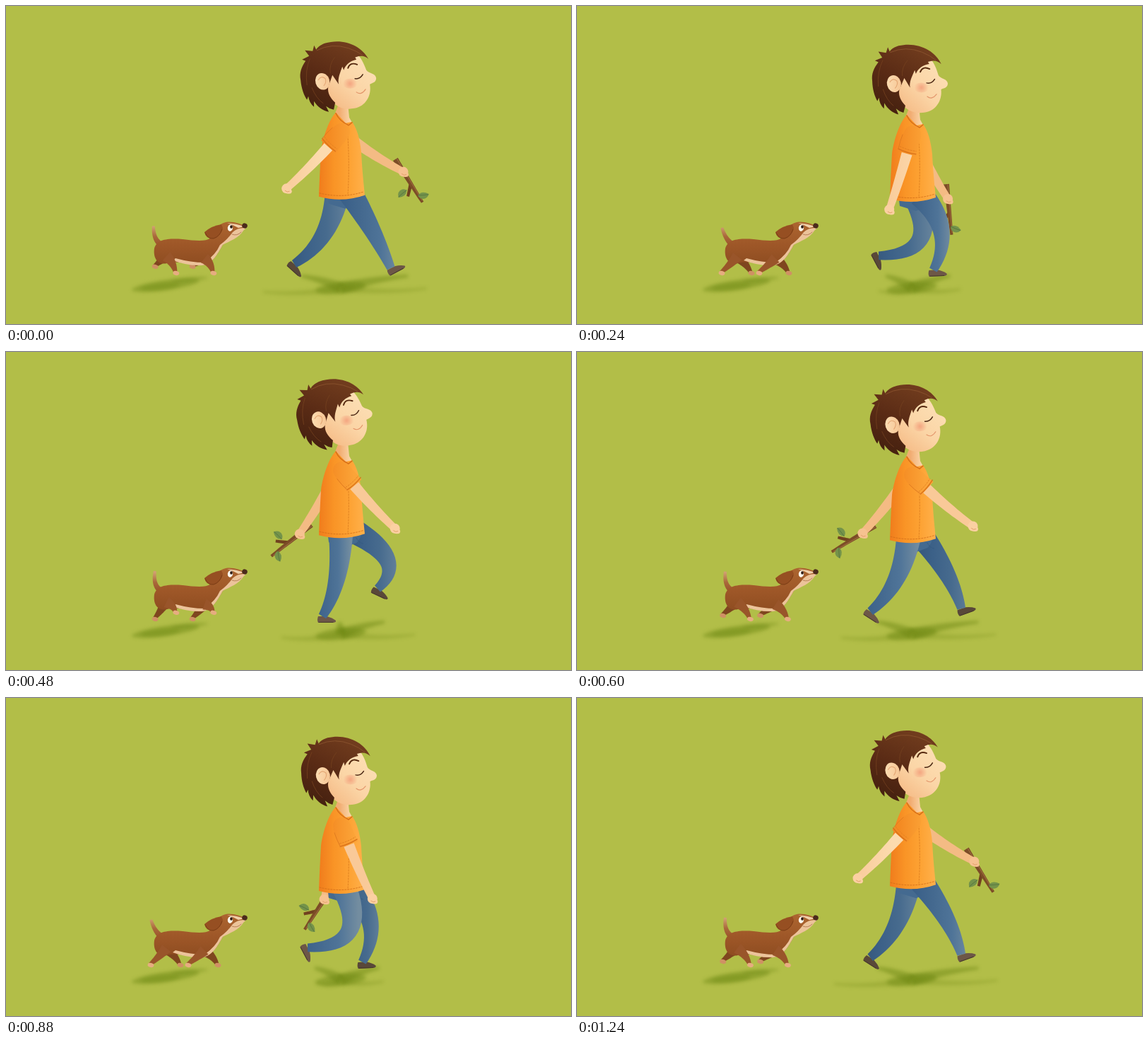
These frames come from a looping animation (800x450 px, 1.28 s). An HTML page with a canvas:

```html
<!DOCTYPE html>
<html lang="en">
<head>
<meta charset="utf-8">
<title>Walk</title>
<style>
  html, body { margin: 0; height: 100%; overflow: hidden; background: #b2be48; }
  canvas { display: block; width: 100vw; height: 100vh; }
</style>
</head>
<body>
<canvas id="stage" width="800" height="450"></canvas>
<script>
const ctx = document.getElementById('stage').getContext('2d');
const LOOP = 1280, STEP = 40, TAU = Math.PI * 2;

// Key poses of one leg, evenly spaced over the loop: knee, ankle, shoe angle.
const gait = [
  [520, 320, 545, 371, -28], // contact
  [531, 317, 525, 373, -6],  // down
  [496, 321, 482, 374, -2],  // passing
  [468, 322, 448, 374, 0],   // push
  [449, 324, 408, 365, 42],  // toe off
  [465, 336, 410, 360, 52],  // trail
  [507, 321, 453, 346, 66],  // lift
  [540, 295, 526, 335, 25]   // reach
];

const wave = (t, peak, period) => Math.cos((t - peak) / period * TAU);
const polar = ([x, y], deg, r) => {
  const a = deg * Math.PI / 180;
  return [x + r * Math.sin(a), y + r * Math.cos(a)];
};
const mid = (a, b, dx = 0, dy = 0) => [(a[0] + b[0]) / 2 + dx, (a[1] + b[1]) / 2 + dy];

// Smooth closed run through the gait poses.
function legPose(t) {
  const n = gait.length, at = t % LOOP / LOOP * n;
  const i = Math.floor(at), u = at - i;
  const [a, b, c, d] = [-1, 0, 1, 2].map(k => gait[(i + k + n) % n]);
  return b.map((p, j) => p + u / 2 * (c[j] - a[j] +
    u * (2 * a[j] - 5 * p + 4 * c[j] - d[j] + u * (3 * (p - c[j]) + d[j] - a[j]))));
}

// Arms swing against each other, resting a little at both ends.
function armPose(t, shoulder, centre, reach, length) {
  const c = wave(t, -10, LOOP), deg = centre + reach * c * (1.3 - .3 * c * c);
  const hand = polar(shoulder, deg, length);
  return { shoulder, hand, deg, elbow: mid(shoulder, hand, 0, 3) };
}

// A paw slides back on the ground and is lifted on its way forward.
function paw(t, x, delay) {
  const a = (t - delay) / 640 * TAU;
  return [x + 21 * Math.cos(a), 377 - 13 * Math.max(0, -Math.sin(a))];
}

const shape = (d, fill) => { ctx.fillStyle = fill; ctx.fill(new Path2D(d)); };

function line(d, color, width = 1, dash = []) {
  ctx.strokeStyle = color;
  ctx.lineWidth = width;
  ctx.lineCap = 'round';
  ctx.setLineDash(dash);
  ctx.stroke(new Path2D(d));
  ctx.setLineDash([]);
}

function oval(x, y, rx, ry, fill, turn = 0) {
  ctx.fillStyle = fill;
  ctx.beginPath();
  ctx.ellipse(x, y, rx, ry, turn, 0, TAU);
  ctx.fill();
}

function ramp(x0, y0, x1, y1, ...colors) {
  const g = ctx.createLinearGradient(x0, y0, x1, y1);
  colors.forEach((c, i) => g.addColorStop(i / (colors.length - 1), c));
  return g;
}

function placed(x, y, deg, draw) {
  ctx.save();
  ctx.translate(x, y);
  ctx.rotate(deg * Math.PI / 180);
  draw();
  ctx.restore();
}

// Tapered curve from a through m to b; `end` cuts it short.
function limb(a, m, b, w0, w1, fill, end = 1) {
  const c = [0, 1].map(k => 2 * m[k] - (a[k] + b[k]) / 2);
  const left = [], right = [];
  for (let i = 0; i <= 20; i++) {
    const s = i / 20 * end, r = 1 - s;
    const [x, y] = [0, 1].map(k => r * r * a[k] + 2 * r * s * c[k] + s * s * b[k]);
    const [dx, dy] = [0, 1].map(k => r * (c[k] - a[k]) + s * (b[k] - c[k]));
    const w = (w0 + (w1 - w0) * i / 20) / 2 / (Math.hypot(dx, dy) || 1);
    left.push([x - dy * w, y + dx * w]);
    right.unshift([x + dy * w, y - dx * w]);
  }
  ctx.beginPath();
  left.concat(right).forEach(p => ctx.lineTo(...p));
  ctx.closePath();
  ctx.fillStyle = fill;
  ctx.fill();
}

function shadows(legs, arms) {
  const shade = a => `rgba(104,132,16,${a})`;
  ctx.save();
  ctx.filter = 'blur(2.5px)';
  const core = [474, 399];
  oval(474, 399, 36, 8, shade(.42), -.1);
  legs.forEach(([, , x, , turn]) => {
    const tip = [x + (turn < 20 ? 24 : 10), 382];
    limb(tip, mid(tip, core, 0, -2), core, 4, 15, shade(.45));
  });
  arms.forEach(({ hand: [x] }) => {
    const tip = [480 + (x - 480) * 1.4, 402 - (x - 480) * .03];
    limb(tip, mid(tip, core, 0, 4), core, 3, 10, shade(.24));
  });
  oval(226, 395, 48, 7, shade(.42), -.14);
  oval(218, 397, 28, 5, shade(.3), -.1);
  oval(260, 387, 26, 3, shade(.32), -.1);
  ctx.restore();
}

function leg([kx, ky, ax, ay, turn], bob, near) {
  placed(ax, ay, turn, () => {
    shape('M-6 0L6 0Q14 2 19 6Q20 9 14 9L-6 9Q-8 5-6 0Z', near ? '#6d5747' : '#594839');
    line('M-5 8.5L15 8.5', '#46382d', 1);
  });
  const hip = [477 + (kx - 480) * .25, 264 + bob];
  const x0 = Math.min(hip[0], kx, ax) - 12, x1 = Math.max(hip[0], kx, ax) + 14;
  const fill = near ? ramp(x0, 0, x1, 0, '#395f88', '#44698f', '#4f7498', '#738da0')
                    : ramp(x0, 0, x1, 0, '#345579', '#3c6188', '#476b8e', '#62809a');
  limb(hip, [kx, ky], [ax, ay], 35, 12, fill);
}

function pelvis(bob) {
  placed(0, bob, 0, () => {
    shape('M454 255L504 255Q505 274 496 281L480 287L457 280Z', '#446a90');
    line('M496 274Q500 281 506 282', '#345a80', .9, [2, 1.5]);
  });
}

function leaf(x, y, deg) {
  placed(x, y, deg, () => {
    shape('M-7 1Q-3-7 8-3Q6 6-2 5Q-6 4-7 1Z', '#74934a');
    line('M-7 1Q0 0 7-2', '#547340', .8);
  });
}

function stick([x, y], deg) {
  placed(x, y, deg, () => {
    limb([20, 0], [26, 6], [33, 13], 5, 4, '#71421f');
    limb([-21, 0], [15, 0], [51, 0], 8, 4, '#7c4c27');
    line('M-20-2L48-1', '#9a683b', 1.2);
    leaf(25, 17, 95);
    leaf(43, -6, -50);
  });
}

function arm({ shoulder, elbow, hand: [x, y] }, near) {
  const skin = near ? ramp(x - 10, 0, x + 50, 0, '#f9c998', '#fcdbae') : '#f4bb84';
  limb(shoulder, elbow, [x, y], 17, 10, skin);
  oval(x, y, 7, 7, near ? '#fbd0a2' : '#f6c290');
  oval(x + 3, y + 4, 4.5, 3.5, near ? '#fbd0a2' : '#f6c290');
  line(`M${x - 2} ${y + 3}q3 3 6 1`, '#e3a06c', 1);
}

function sleeve({ shoulder: [x, y], elbow, hand, deg }) {
  const fill = ramp(x - 18, 0, x + 18, 0, '#f48a22', '#fba438');
  oval(x, y, 12, 12, fill);
  limb([x, y], elbow, hand, 25, 27, fill, .24);
  placed(x, y, -deg, () => {
    line('M-13 26Q0 28 13 26', '#d9711a', 1.3);
    line('M-13 5Q-14 15-13 25', '#de7a20', .9);
    line('M-12 22Q0 24 12 22', '#e07d20', .8, [2, 2]);
  });
}

function torso(bob) {
  placed(0, bob, 0, () => {
    shape('M473 134L484 138L486 158L491 167L482 171L466 152Z',
          ramp(472, 0, 487, 0, '#f1ac72', '#fad3a4'));
    shape('M467 151C458 160 449 184 446 206Q444 240 443 270Q476 279 508 268Q504 230 503 207' +
          'Q500 178 490 164L481 166Z', ramp(443, 0, 507, 0, '#f07c1c', '#f99426', '#fda233', '#ffb04a'));
    line('M467 152Q472 163 485 169L490 165', '#d8701a', 1.6);
    line('M444 265Q476 273 507 263', '#d4701a', .9, [2, 2]);
    line('M483 172Q487 220 484 268', '#dc7d20', .9, [2, 2]);
  });
}

function head(x, y, turn) {
  placed(x, y, turn, () => {
    ctx.translate(-449, -108);
    shape('M460 80L499 70C505 77 508 84 511 92C514 97 524 96 525 103C525 110 518 110 516 112' +
          'C519 128 510 143 494 146C474 150 458 139 456 118Z',
          ramp(465, 145, 515, 85, '#f5bb86', '#fbd5a6', '#fcdeb3'));
    const glow = ctx.createRadialGradient(488, 111, 1, 488, 111, 10);
    glow.addColorStop(0, 'rgba(240,140,108,.6)');
    glow.addColorStop(1, 'rgba(240,140,108,0)');
    oval(488, 111, 11, 7, glow);
    shape('M514 76C504 57 478 46 452 54C447 56 442 59 440 63L437 57L435 65L424 64L430 72' +
          'L420 77L425 79C419 88 416 96 418 106C419 118 423 128 427 134L429 129Q430 138 437 144' +
          'L437 136C442 144 449 149 458 151L454 143Q459 147 465 148L467 138' +
          'C460 131 456 125 457 116L463 99L472 112C470 104 474 96 477 87L479 92' +
          'C482 84 488 79 497 77L495 74Q506 69 514 76Z',
          ramp(435, 150, 480, 50, '#43200f', '#5a2b15', '#723d1e'));
    line('M441 64Q462 53 486 61Q498 65 506 71', '#8d5630', .8);
    line('M431 76Q424 92 427 113', '#74411f', .8);
    line('M466 74Q458 84 460 96', '#74411f', .8);
    line('M434 117Q440 132 450 139', '#74411f', .8);
    oval(449, 108, 10, 12, ramp(439, 0, 460, 0, '#fcdcb1', '#f6c594'), -.3);
    line('M443 106Q447 99 453 104Q455 109 451 114', '#e3a674', 1.1);
    line('M485 89Q488 80 498 84', '#55290f', 1.9);
    line('M495 104Q502 105 506 98', '#4a2613', 1.5);
    line('M497 123Q504 128 510 119', '#e2946a', 1.1);
  });
}

function dogLeg(hip, foot, near) {
  limb(hip, mid(hip, foot, 2, -1), foot, 16, 5, near ? '#99552a' : '#7f461f');
  oval(foot[0] + 1, foot[1] + 1, 4.5, 3, near ? '#e6ad80' : '#cf9164', .25);
}

function dog(t) {
  const sway = wave(t, 190, 640);
  limb([222, 339], [212, 329], [208 - 3 * sway, 312 + 2 * sway], 9, 4,
       ramp(0, 340, 0, 312, '#995229', '#a9683a', '#d0a070'));
  dogLeg([225, 354], paw(t, 225, 240), false);
  dogLeg([280, 357], paw(t, 278, 240), false);
  shape('M340 311C332 309 322 304 311 306C300 308 296 319 290 328C282 334 268 332 250 330' +
        'C232 329 214 329 210 343C208 357 215 367 228 364C246 359 260 368 276 367' +
        'C292 366 300 350 307 338C315 332 329 328 335 318Z',
        ramp(0, 308, 0, 368, '#ab642f', '#9e5728', '#8d4c20'));
  shape('M340 314Q328 313 321 320Q313 331 303 338Q297 352 281 363Q262 363 240 357L236 360' +
        'Q258 368 277 367C292 366 300 350 307 338C316 333 330 328 336 318Z', '#ecc39a');
  dogLeg([227, 354], paw(t, 225, 560), true);
  dogLeg([281, 357], paw(t, 278, 560), true);
  shape('M305 309Q291 311 281 320Q283 330 294 329Q304 326 307 314Z', '#964f22');
  line('M282 321Q286 330 294 329Q303 326 306 316', '#763913', .9);
  shape('M313 307Q326 308 338 312L329 314Q320 309 313 307Z', '#efcfaa');
  oval(317.5, 314, 3.6, 4.8, '#fffaf0', .2);
  oval(319, 312.5, 1.8, 2.3, '#2b1710');
  oval(338, 311, 3.8, 3.6, '#4b2a1b', .4);
  line('M320 323Q327 326 333 320', '#b17850', .9);
}

function draw(t) {
  ctx.fillStyle = '#b2be48';
  ctx.fillRect(0, 0, 800, 450);
  const bob = 9 * wave(t, 140, LOOP / 2) - 2;
  const nearLeg = legPose(t), farLeg = legPose(t + LOOP / 2);
  const nearArm = armPose(t, [475, 178 + bob], 3, -47, 112);
  const farArm = armPose(t, [472, 176 + bob], 9, 48, 108);

  shadows([nearLeg, farLeg], [nearArm, farArm]);
  dog(t);
  stick(farArm.hand, 112 - .95 * farArm.deg);
  arm(farArm, false);
  leg(farLeg, bob, false);
  pelvis(bob);
  leg(nearLeg, bob, true);
  torso(bob);
  head(447 + 4 * wave(t, 130, LOOP / 2), 107 + bob, .5 + 4 * wave(t, 170, LOOP / 2));
  arm(nearArm, true);
  sleeve(nearArm);
}

const start = performance.now();
let last = -1;
function tick() {
  const t = Math.floor((performance.now() - start) / STEP) * STEP % LOOP;
  if (t !== last) draw(last = t);
  requestAnimationFrame(tick);
}
tick();
</script>
</body>
</html>
```
